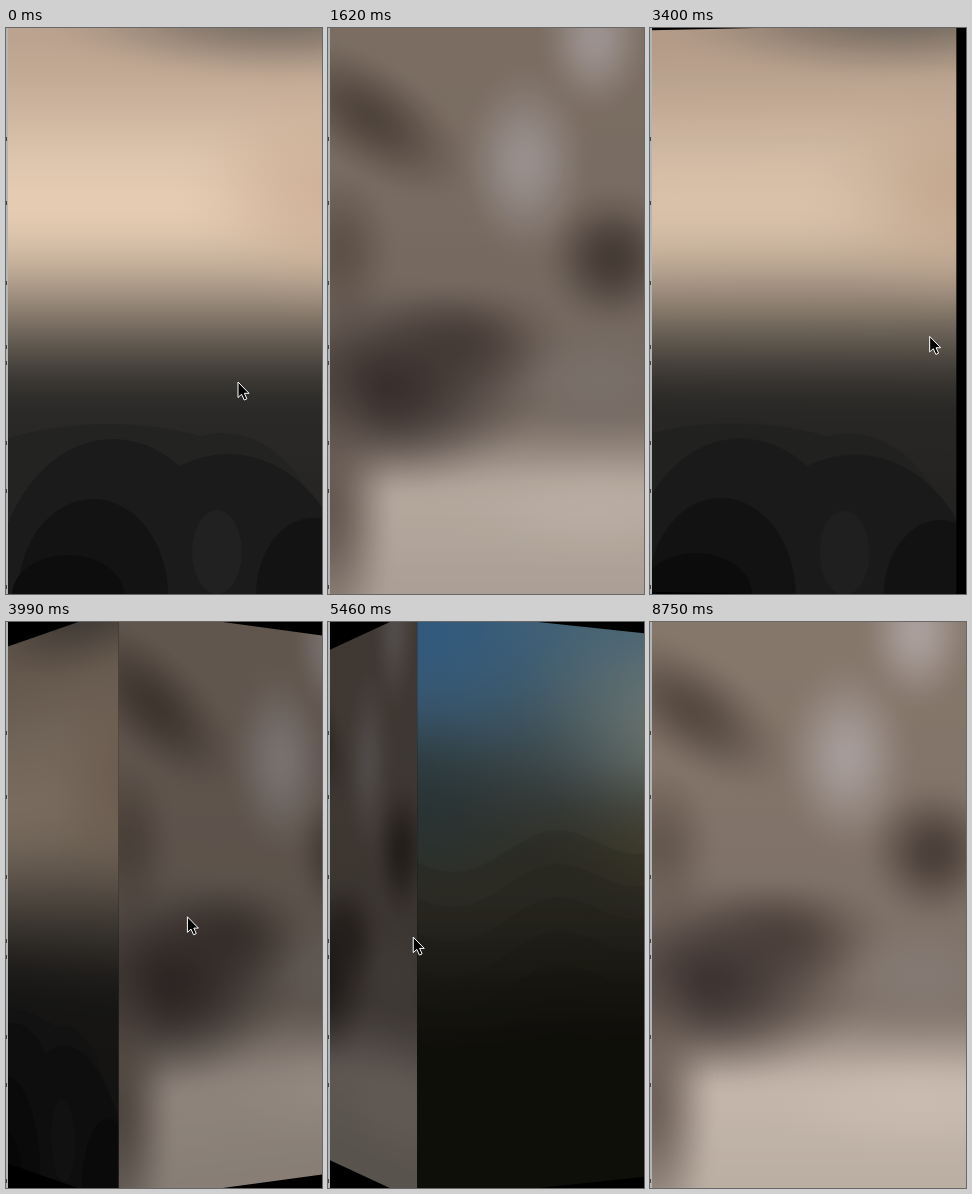
Recreate the animation shown at these times as an HTML page with a canvas. Size 316 by 566 pixels, loop 8.83 s.

```html
<!DOCTYPE html>
<html lang="zh">
<head>
<meta charset="utf-8">
<title>Cube transition</title>
<style>
  html, body { margin: 0; width: 100%; height: 100%; overflow: hidden; background: #000; }
  #stage { position: absolute; left: 0; top: 0; width: 316px; height: 566px; overflow: hidden; background: #000; }
  #phone { position: absolute; left: 2px; top: -1px; width: 320px; height: 568px; overflow: hidden; }
  #home { position: absolute; inset: 0; background: #fff; color: #222; font: 12px/20px Inter, "Noto Sans CJK SC", "Noto Sans CJK", sans-serif; }
  #home span, #home svg { position: absolute; }
  #carrier { left: 6px; top: 0; }
  #clock { left: 0; width: 320px; top: 0; text-align: center; font-weight: 600; color: #000; }
  #square { position: absolute; left: 150px; top: 200px; width: 80px; height: 80px; background: #000; }
  #cube { position: absolute; inset: 0; background: #000; overflow: hidden; perspective: 1391px; }
  #cube canvas, #edge { position: absolute; left: 0; top: 0; }
  #cursor { position: absolute; left: 0; top: 0; overflow: visible; }
</style>
</head>
<body>
<div id="stage">
  <div id="phone">
    <div id="home">
      <span id="carrier">运营商</span>
      <svg style="left:46px;top:4px" width="14" height="12" fill="none" stroke="#000" stroke-width="1.7">
        <path d="M1.2 4.6Q7 -.6 12.8 4.6M3.3 7Q7 3.8 10.7 7"/>
        <path d="M7 10.8L4.9 8.6Q7 7 9.1 8.6Z" fill="#000" stroke="none"/>
      </svg>
      <span id="clock">下午6:18</span>
      <svg style="left:290px;top:5px" width="28" height="11">
        <rect x=".5" y=".5" width="22" height="9" rx="1.5" fill="#fff" stroke="#000"/>
        <rect x="1.5" y="1.5" width="20" height="7"/>
        <path d="M23.5 3.5h1v3h-1z"/>
      </svg>
      <div id="square"></div>
    </div>
    <div id="cube"></div>
  </div>
  <canvas id="edge" width="2" height="566"></canvas>
  <svg id="cursor" width="14" height="20">
    <path d="M0 0V15.5L3.6 12.3L6.2 18L8.9 16.8L6.4 11.3H11Z" fill="#000" stroke="#fff" stroke-linejoin="round"/>
  </svg>
</div>
<script>
const W = 320, H = 568, LOOP = 8830, STEP = 147.7, SWIPE = 1040;
const $ = id => document.getElementById(id);
const cube = $('cube'), cursor = $('cursor');

const clamp = u => Math.min(1, Math.max(0, u));
const smooth = u => u * u * (3 - 2 * u);
const mix = (a, b, u) => a + (b - a) * u;
const ease = (from, to, t) => smooth(clamp((t - from) / (to - from)));

function face(paint) {
  const c = document.createElement('canvas');
  c.width = W;
  c.height = H;
  paint(c.getContext('2d'));
  cube.append(c);
  return c;
}

// Vertical colour ramp, eased between stops
function ramp(g, ...stops) {
  const grad = g.createLinearGradient(0, 0, 0, H);
  for (let i = 1; i < stops.length; i++) {
    const [y0, c0] = stops[i - 1], [y1, c1] = stops[i];
    for (let u = 0; u <= 1; u += 1 / 16) {
      const rgb = c0.map((v, k) => mix(v, c1[k], smooth(u)));
      grad.addColorStop(mix(y0, y1, u) / H, `rgb(${rgb})`);
    }
  }
  g.fillStyle = grad;
  g.fillRect(0, 0, W, H);
}

// Soft elliptical patch with a bell-shaped falloff
function blob(g, x, y, rx, ry, color, alpha, tilt = 0) {
  const grad = g.createRadialGradient(0, 0, 0, 0, 0, 1);
  for (let i = 0; i <= 10; i++) {
    grad.addColorStop(i / 10, `rgba(${color},${alpha * smooth(1 - i / 10)})`);
  }
  g.save();
  g.translate(x, y);
  g.rotate(tilt);
  g.scale(rx, ry);
  g.fillStyle = grad;
  g.fillRect(-1, -1, 2, 2);
  g.restore();
}

function mound(g, color, x, rx, ry, y = H) {
  g.fillStyle = color;
  g.beginPath();
  g.ellipse(x, y, rx, ry, 0, 0, 7);
  g.fill();
}

function dusk(g) {
  ramp(g, [0, [188, 163, 143]], [180, [228, 203, 178]], [395, [41, 40, 38]], [H, [32, 32, 31]]);
  blob(g, 270, -15, 260, 75, '110,102,94', .9);
  blob(g, 330, 165, 170, 130, '200,170,145', .75);
  mound(g, '#232322', 100, 250, 171);
  mound(g, '#232322', 215, 110, 162);
  mound(g, '#1b1b1b', 105, 118, 156);
  mound(g, '#1b1b1b', 220, 120, 141);
  mound(g, '#131313', 85, 75, 96);
  mound(g, '#131313', 305, 57, 77);
  mound(g, '#0d0d0d', 60, 56, 40);
  mound(g, '#212121', 209, 25, 42, 525);
}

function stone(g) {
  ramp(g, [0, [134, 119, 107]], [370, [125, 112, 103]], [475, [195, 181, 170]], [H, [187, 174, 163]]);
  blob(g, 40, 90, 125, 62, '78,66,58', .85, .6);
  blob(g, 10, 225, 60, 90, '94,81,71', .8);
  blob(g, 265, 10, 60, 85, '172,161,158', .95);
  blob(g, 195, 135, 72, 105, '167,157,154', .95);
  blob(g, 282, 231, 76, 76, '72,61,55', .95);
  blob(g, 270, 355, 110, 70, '136,126,120', .7);
  blob(g, 135, 315, 110, 65, '74,62,56', .8);
  blob(g, 60, 360, 165, 115, '62,52,49', 1);
  blob(g, 0, 480, 70, 180, '100,87,79', .9);
  blob(g, 265, 482, 160, 60, '205,191,180', .6);
}

function shore(g) {
  ramp(g, [0, [88, 126, 149]], [260, [62, 60, 50]], [440, [25, 23, 18]], [H, [21, 19, 16]]);
  blob(g, 0, 0, 200, 190, '55,112,165', .75);
  blob(g, 320, 95, 230, 150, '158,165,150', .75);
  blob(g, 320, 215, 200, 90, '96,88,58', .55);
  blob(g, 0, 190, 150, 110, '46,64,68', .6);
  g.fillStyle = 'rgba(22,20,14,.12)';
  for (let base = 240; base < 480; base += 34) {
    g.beginPath();
    g.moveTo(0, H);
    for (let x = 0; x <= W; x += 4) g.lineTo(x, base - x / 10 + 16 * Math.cos((x - 45) * Math.PI / 105));
    g.lineTo(W, H);
    g.fill();
  }
}

// Sliver of the window behind: light border with ends of text lines
function border(g) {
  g.fillStyle = '#b0b6b7';
  g.fillRect(0, 0, 2, 566);
  g.fillStyle = '#444';
  for (const line of [0, 4, 9, 13, 14, 19, 22, 28]) g.fillRect(0, 109 + line * 16, 1, 4);
}

const faces = [dusk, stone, shore].map(face);
border($('edge').getContext('2d'));

// Hand movements, each lasting SWIPE unless the next one starts first
const moves = [
  { start: 100, page: [0, 1], x: [232, -20], y: [354, 330] },
  { start: 1618, page: [1, 1], x: [-20, 187], y: [300, 250] },
  { start: 2660, page: [0, 0], x: [187, 340], y: [250, 340] },
  { start: 3329, page: [0, 1], x: [291, 118], y: [310, 286] },
  { start: 4737, page: [1, 2], x: [291, -3], y: [320, 313] },
  { start: 6139, page: [2, 1], x: [-3, 538], y: [313, 338] },
];

function draw(t) {
  const move = moves.findLast(m => m.start <= t) || moves[0];
  const u = clamp((t - move.start) / SWIPE);
  const page = mix(...move.page, u);
  const away = ease(1700, 2300, t) - ease(2700, 3250, t);
  const dim = .08 * (ease(1400, 1620, t) - ease(2300, 2500, t));

  faces.forEach((f, i) => {
    const angle = (i - page) * 90;
    f.style.visibility = Math.abs(angle) < 84 ? 'visible' : 'hidden';
    f.style.transform = `translateZ(${-W / 2}px) rotateY(${angle}deg) translateZ(${W / 2}px)`;
    f.style.filter = `brightness(${(1 - dim) * (1 - Math.abs(angle) / 120)})`;
  });
  cube.style.transform = `translateY(${away * H}px)`;
  cursor.style.transform = `translate(${mix(...move.x, u)}px, ${mix(...move.y, u)}px)`;
}

const start = performance.now();
function tick() {
  const t = (performance.now() - start) % LOOP;
  draw(Math.floor((t + 8) / STEP) * STEP);
  requestAnimationFrame(tick);
}
tick();
</script>
</body>
</html>
```
